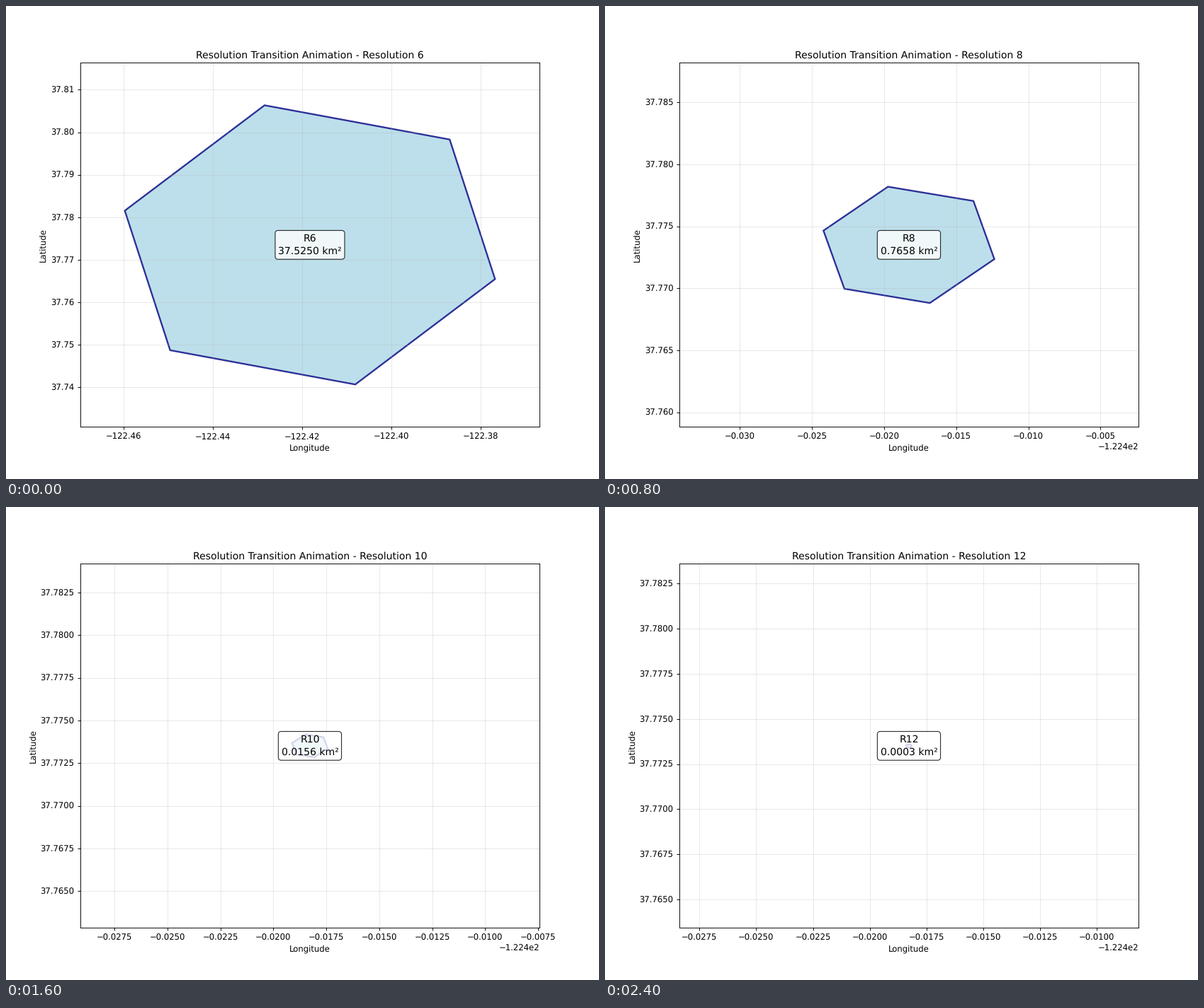
A matplotlib script that plays this animation: 837x669 px, repeating every 2.8 s.

```python
import numpy as np
import matplotlib.pyplot as plt
from matplotlib.animation import FuncAnimation
from matplotlib.patches import FancyBboxPatch, Polygon

W, H, DPI = 837, 669, 83.7
FONT_SIZE = 12
plt.rcParams["font.family"] = "DejaVu Sans"
plt.rcParams["text.hinting"] = "none"

CENTER = np.array([-122.418275, 37.77351])
MARGIN = 0.01
BASE_RES, BASE_AREA = 6, 37.525

# Two neighbouring corners span the centrally symmetric base cell.
A = np.array([-0.010152, 0.03284])
B = np.array([0.04145, -0.00805])
BASE = np.array([A, A + B, B, -A, -A - B, -B])


def hexagon(level):
    """Corners of the centre cell; each level holds 1/7 of the area."""
    pts = BASE / 7 ** (level // 2)
    if level % 2:
        pts = (2 * pts + np.roll(pts, 1, axis=0)) / 7
    return CENTER + pts


fig, ax = plt.subplots(figsize=((W + 0.001) / DPI, (H + 0.001) / DPI), dpi=DPI)


def add_label(text):
    """Centred two-line label on a rounded box of fixed line height."""
    label = ax.text(*CENTER, text, ha="center", va="center",
                    fontsize=FONT_SIZE, linespacing=1.35)
    inches = fig.dpi_scale_trans
    area = label.get_window_extent().transformed(inches.inverted())
    em = FONT_SIZE / 72
    height = 2 * 1.16 * em
    ax.add_patch(FancyBboxPatch(
        (area.x0, (area.y0 + area.y1 - height) / 2), area.width, height,
        boxstyle="round,pad=0.3", mutation_scale=em, transform=inches,
        facecolor="white", edgecolor="black", alpha=0.8, zorder=2.9))


def draw(level):
    ax.clear()
    res = BASE_RES + level
    pts = hexagon(level)
    (x0, y0), (x1, y1) = pts.min(axis=0) - MARGIN, pts.max(axis=0) + MARGIN
    ax.set_xlim(x0, x1)
    ax.set_ylim(y0, y1)
    ax.add_patch(Polygon(pts, facecolor="lightblue", edgecolor="navy",
                         linewidth=2, alpha=0.8))
    add_label(f"R{res}\n{BASE_AREA / 7 ** level:.4f} km²")
    ax.set_title(f"Resolution Transition Animation - Resolution {res}",
                 fontsize=FONT_SIZE)
    ax.set_xlabel("Longitude")
    ax.set_ylabel("Latitude")
    ax.grid(True, alpha=0.3)
    return []


anim = FuncAnimation(fig, draw, frames=7, interval=400,
                     init_func=lambda: draw(0), repeat=True, repeat_delay=0)
plt.show()
```
